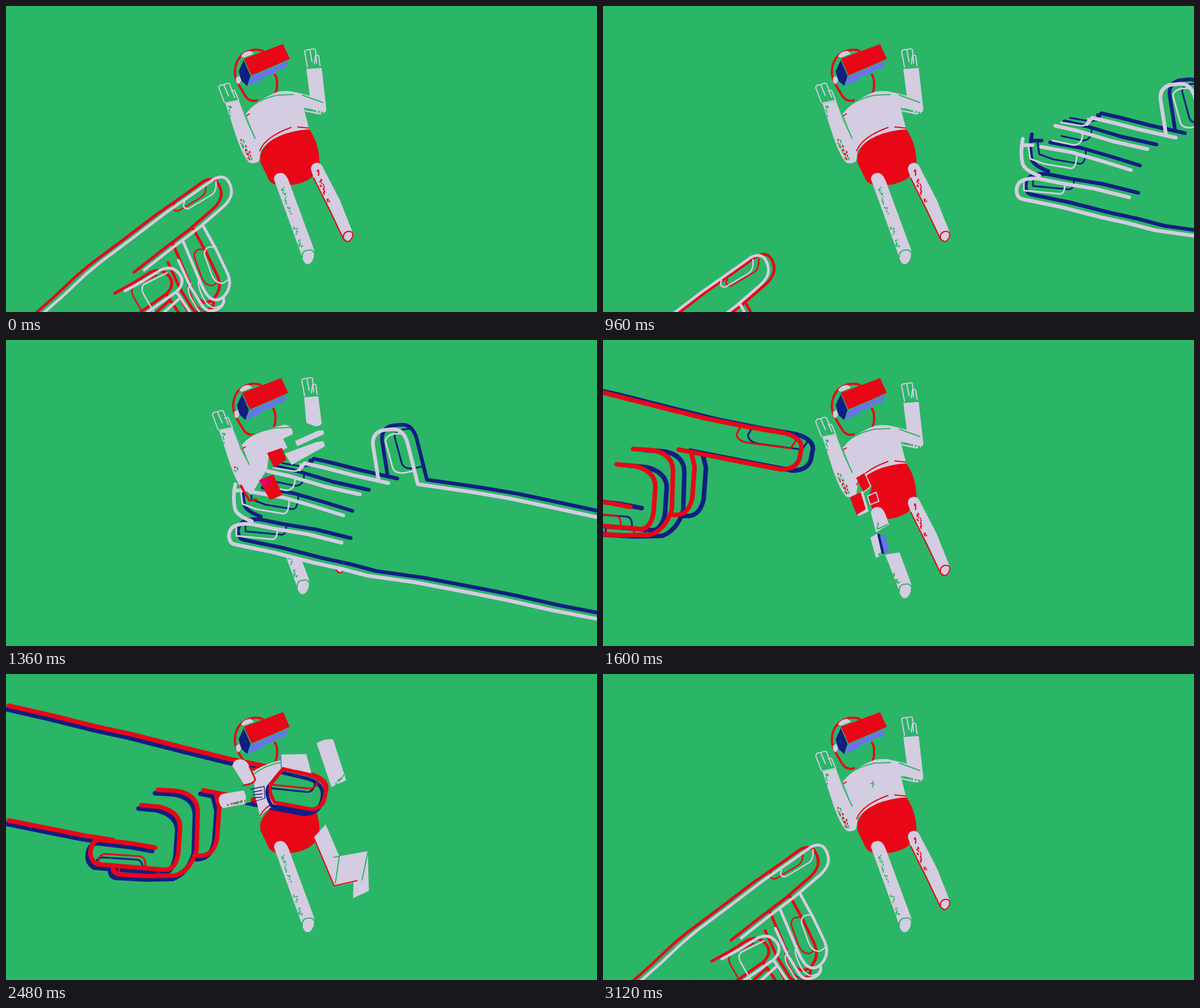
Write an HTML page with a canvas that moves like this. It is 1039 px wide and 539 px high and loops after 3.2 s.

```html
<!DOCTYPE html>
<html lang="en">
<head>
<meta charset="utf-8">
<title>Poke</title>
<style>
  html, body { margin: 0; width: 100%; height: 100%; overflow: hidden; background: #2bb567; }
  canvas { display: block; }
</style>
</head>
<body>
<canvas id="stage" width="1039" height="539"></canvas>
<script>
const ctx = document.getElementById('stage').getContext('2d');
const GREEN = '#2bb567', PALE = '#d4cce0', RED = '#e90617', NAVY = '#101f82', BLUE = '#6675e8', PINK = '#e6005c';
const LOOP = 3200, STEP = 80;

const fill = (d, color) => { ctx.fillStyle = color; ctx.fill(new Path2D(d)); };
const line = (d, color, width = 2) => {
  ctx.strokeStyle = color;
  ctx.lineWidth = width;
  ctx.stroke(new Path2D(d));
};
const at = (x, y, draw) => { ctx.save(); ctx.translate(x, y); draw(); ctx.restore(); };

// Piecewise linear value of [time, ...values] keys
function track(t, keys) {
  const i = keys.findIndex(k => k[0] > t);
  if (i === 0) return keys[0].slice(1);
  if (i < 0) return keys.at(-1).slice(1);
  const a = keys[i - 1], b = keys[i], p = (t - a[0]) / (b[0] - a[0]);
  return a.slice(1).map((v, j) => v + (b[j + 1] - v) * p);
}

// Stable scatter of dots along a segment
function speckle(x1, y1, x2, y2, count, color, spread = 5) {
  const noise = n => { const s = Math.sin(n * 91.7 + x1) * 4375.5; return s - Math.floor(s); };
  ctx.fillStyle = color;
  for (let i = 0; i < count; i++) {
    const p = noise(i), side = noise(i + 50) * spread;
    ctx.fillRect(x1 + (x2 - x1) * p + side, y1 + (y2 - y1) * p, 2, 2 + noise(i + 90) * 2);
  }
}

/* Hands */
const pointUp = {
  thick: 5, thin: 2.6,
  area: 'M-30 625L102 509L140 473L165 452L225 407L280 365L330 330L365 305Q380 297 389 306Q398 318 396 332Q393 345 378 357L340 390L243 465L60 620Z',
  bold: 'M-30 625L68 539L102 509L140 473L165 452L225 407L280 365L330 330L365 305Q380 297 389 306Q398 318 396 332Q393 345 378 357L340 390L290 428L243 465' +
    'M347 388L370 430L390 472Q398 492 386 508Q374 523 360 515Q351 509 341 485L312 416' +
    'M303 448L324 494L345 528Q353 541 370 535Q386 527 382 514' +
    'M209 502L240 485L270 466Q290 456 302 469Q318 485 300 503L245 542L190 585M300 504L336 558M255 560L303 517',
  fine: 'M314 345Q308 357 321 357L361 333Q371 327 369 309' +
    'M369 425Q348 421 349 438L361 472Q368 490 382 488L392 481' +
    'M341 479Q334 487 344 508Q355 534 369 531L380 527' +
    'M283 470L243 490Q236 496 242 508L264 546M325 490Q316 497 325 514L340 539'
};
const flat = {
  thick: 6.5, thin: 3,
  area: 'M525 217L655 248L645 182Q645 158 680 157Q701 158 706 180L724 254L1100 324L1100 503L880 458L635 415L540 392L402 360Q391 355 392 340Q393 322 430 318Q392 300 405 254L460 231Z',
  bold: 'M1100 324L1039 312L960 295L885 279L820 268L724 254L706 182Q699 157 680 157L662 159Q644 164 645 184L655 248' +
    'M672 252L610 238L560 225L525 217L516 228' +
    'M622 272L560 258L500 240L460 231M593 309L545 294L490 278L435 268' +
    'M590 357L530 342L470 332L430 324Q391 321 392 346Q393 358 402 360L470 374L540 392L590 403L635 415L720 427L820 446L880 458L960 476L1100 503' +
    'M432 319Q409 311 403 299Q398 280 403 254M405 265L420 265',
  fine: 'M699 165Q669 163 667 178L680 226Q685 236 700 234L720 230' +
    'M470 225L505 231Q517 232 518 218M455 257L493 265Q508 264 508 245' +
    'M413 268L416 289L440 298L488 306Q497 306 498 282' +
    'M405 326L405 345L468 351Q477 351 477 333'
};
const pointDown = {
  thick: 8, thin: 3.2,
  area: 'M5 56L160 93L220 106L314 130L394 149L474 166L534 176Q564 185 563 202L559 222Q552 240 527 240L454 226L347 205Z',
  bold: 'M5 56L80 73L160 93L220 106L314 130L394 150L474 166L534 176Q564 185 563 202L559 222Q552 240 527 240L454 226L347 205' +
    'M267 204L300 206Q338 212 337 245L335 310Q325 345 298 355L250 356L197 353Q187 350 188 338' +
    'M238 231L270 234Q306 243 306 270L303 315Q298 345 280 345L220 340L160 335Q144 325 150 305Q155 292 165 292L225 299L262 306' +
    'M369 210L375 235L371 290Q365 318 345 320L335 320' +
    'M5 258L75 272L140 285L187 292',
  fine: 'M163 332Q162 318 175 317L235 321Q246 322 245 340M199 340L199 350M268 343L268 352' +
    'M456 165L449 177Q449 190 469 193L544 203L554 188'
};

function drawHand(hand, [x, y], [ex, ey], main, echo) {
  const outline = color => { line(hand.fine, color, hand.thin); line(hand.bold, color, hand.thick); };
  at(x, y, () => {
    fill(hand.area, GREEN);
    at(ex, ey, () => outline(echo));
    outline(main);
  });
}

function fingertip([ex, ey]) {
  const tip = 'M487 167L534 178Q565 187 561 210Q557 239 536 238L472 226Q460 205 466 193Z';
  const nail = 'M468 195L536 202Q547 200 548 186';
  fill(tip, GREEN);
  at(ex, ey, () => { line(nail, NAVY, 3); line(tip, NAVY, 6); });
  line(nail, RED, 3);
  line(tip, RED, 6);
}

/* Body parts */
function head() {
  line('M451 79C440 75 425 77 414 87C402 98 400 118 405 130Q411 143 417 152M473 121L476 128', RED, 4);
  fill('M413 89Q418 79 430 79L436 84Q428 87 418 91Z', PALE);
  fill('M404 127L410 123L414 131L409 138L405 135Z', PALE);
  fill('M418 95L430 123L424 141L414 132L409 115Z', NAVY);
  fill('M432 124L497 96L491 110L477 113L470 120L455 123L450 130L425 141Z', BLUE);
  fill('M418 93L487 67L499 93L432 123Z', RED);
  line('M418 94L431 123L498 95', GREEN, 1.2);
}
const chin = () => line('M417 152Q426 171 441 166M476 128Q478 146 474 152', RED, 4);

function leftArm() {
  line('M384 170L374 144Q375 138 383 139L391 158M383 139Q388 135 393 137L402 161M396 150Q402 146 403 152L409 166L386 171', PALE);
  fill('M386 172L411 167L438 233L448 255L445 273Q438 279 428 276Q417 266 404 228Z', PALE);
  speckle(389, 174, 394, 198, 10, GREEN);
  speckle(406, 232, 428, 272, 22, GREEN, 9);
  speckle(408, 234, 426, 270, 14, RED, 9);
}

const rightHand = () =>
  line('M530 108L525 80Q527 76 534 77L538 98M534 77Q541 74 544 77L546 101M542 102L544 88Q550 85 550 90L552 105', PALE);

function rightArm() {
  rightHand();
  fill('M510 152L534 158L528 111L555 109L563 180Q564 191 550 191L522 185L511 165Z', PALE);
  line('M521 157L557 170M510 161L520 182', GREEN);
  speckle(520, 179, 556, 187, 28, GREEN, 4);
}

function torso() {
  fill('M421 188Q440 166 478 151Q500 147 517 155L533 217Q470 222 447 256L440 262L438 233Z', PALE);
  line('M422 188Q438 165 478 157L505 156M411 168L424 203L438 233', GREEN);
  line('M423 193L428 190', RED);
}
const waistline = () => line('M446 255Q456 230 501 214M513 213L532 215', RED);

// Left leg, cut off above the given height
function leftLeg(top) {
  const left = 471 + (top - 305) * .363, right = 497 + (top - 308) * .369;
  fill(top ? `M${left} ${top + 4}L${right} ${top}L542 430L541 443Q537 455 530 455Q523 454 520 440Z`
    : 'M471 305Q472 294 484 294Q492 295 497 308L542 430L541 443Q537 455 530 455Q523 454 520 440Z', PALE);
  line('M521 443Q520 430 532 430Q540 429 541 434', GREEN);
  speckle(482, Math.max(318, top), 517, 430, 34, GREEN, 6);
}

function rightLeg() {
  fill('M536 288Q536 277 547 276Q554 277 557 284L587 342L610 400Q611 414 601 415L593 408L570 358L541 303Z', PALE);
  line('M541 303L570 362L593 410Q602 421 609 407Q612 396 601 397Q592 399 593 410', RED);
  speckle(540, 283, 562, 345, 26, RED, 7);
}

const shorts = () => fill('M447 262Q462 226 512 217L534 218Q552 245 551 280Q545 308 505 315L475 315Q463 312 460 302L447 275Z', RED);

/* Poses: lower is behind the hands, upper in front, front covers the fingertip */
const restLower = () => { shorts(); leftLeg(0); rightLeg(); };
const restUpper = () => { head(); chin(); leftArm(); rightArm(); torso(); waistline(); };

const poses = {
  rest: { lower: restLower, upper: restUpper },

  poke: {
    lower() {
      fill('M438 261L459 251L480 240Q497 223 512 221L535 221Q552 248 551 280Q545 306 512 315Q497 313 488 296L478 279L460 292L462 304L454 308Z', RED);
      fill('M459 292L474 279L489 310L474 316Z', PALE);
      leftLeg(317);
      rightLeg();
    },
    upper() {
      head();
      chin();
      at(-3, 0, leftArm);
      at(-2, 0, rightArm);
      torso();
      fill('M447 256L470 228L532 214L535 221Q507 221 480 238L464 258L455 252Z', PALE);
      line('M454 252L474 236M473 231Q495 217 518 214L534 216', RED);
    }
  },

  slap: {
    lower() { at(-9, -7, () => leftLeg(0)); at(-13, -5, rightLeg); },
    upper() {
      at(-3, 0, () => { head(); chin(); });
      at(-11, -12, leftArm);
      at(-5, -9, rightHand);
      fill('M524 101L549 99L555 147Q550 154 541 151L528 146Z', PALE);
      fill('M508 178L548 160L558 159L559 166L512 187Z', PALE);
      fill('M490 200L545 180L558 178L561 187L502 220Z', PALE);
      fill('M414 183Q432 163 490 149Q505 152 504 166L487 174L495 190L462 203L459 228L446 248L431 273L419 262L400 235L428 220Z', PALE);
      line('M415 183Q432 162 473 155L502 154M400 156L413 191L427 218', GREEN);
      line('M416 191L421 188', RED);
      fill('M459 199L485 190L493 211L471 225Z', RED);
      fill('M445 247L470 237L486 273L464 282Z', RED);
      fill('M445 247L460 240L467 250L454 262Z', PINK);
      line('M413 257L428 283L440 281', RED, 4);
    }
  },

  crack: {
    lower() {
      fill('M462 238Q485 220 512 217L534 218Q552 245 551 280Q545 308 505 315L480 313L466 278L472 262Z', RED);
      fill('M471 305Q472 294 484 294Q492 295 497 308L503 325L480 339Z', PALE);
      line('M482 333L484 322M483 333L500 325', GREEN);
      fill('M470 348L482 341L491 378L480 384Z', PALE);
      fill('M482 341L487 342L495 376L490 377Z', NAVY);
      fill('M487 345L495 342L503 370L495 377Z', BLUE);
      leftLeg(374);
      rightLeg();
    },
    upper() {
      restUpper();
      fill('M445 243L460 234L472 258L458 268Z', RED);
      line('M461 236L471 258L458 268', PALE);
      fill('M434 277L457 266L467 302L449 310Z', PALE);
      fill('M434 277L453 268L462 298L446 308Z', RED);
      line('M465 275L480 268L485 284L470 290Z', PALE);
    }
  },

  pierce: {
    lower() {
      fill('M461 252L467 246L528 250L526 270L513 290L482 293Z', RED);
      fill('M527 254L560 242L564 255L530 269Z', RED);
      fill('M519 300L530 272L556 265L557 285L535 303Z', RED);
      fill('M477 310Q480 296 490 296Q497 297 503 308Q525 345 527 370L538 447Q538 458 527 459Q517 455 515 440L507 385Q500 345 483 322Z', PALE);
      line('M517 455Q515 442 525 442L536 443', GREEN);
      speckle(481, 316, 496, 350, 16, GREEN);
      speckle(505, 372, 512, 425, 14, GREEN, 3);
      at(3, 6, rightLeg);
    },
    upper() {
      at(13, -17, head);
      line('M474 132Q474 148 457 157Q438 170 418 163', RED, 4);
      ctx.save();
      ctx.translate(404, 164);
      ctx.rotate(.27);
      at(-398, -170, leftArm);
      ctx.restore();
      at(9, -7, rightArm);
      fill('M426 183Q440 163 475 150L501 146L509 160L508 172L485 170L470 185L466 205L450 217L440 207Z', PALE);
      line('M430 187Q445 163 480 152L502 151', GREEN);
      fill('M420 217L445 207L459 233L428 248Z', PALE);
      fill('M557 222L573 222L573 238L560 237Z', BLUE);
      fill('M573 222L590 219L589 236L573 238Z', RED);
      fill('M557 222L573 217L591 218L573 222Z', NAVY);
    },
    front() {
      fill('M449 195L452 187L460 187L460 206L449 203Z', NAVY);
      fill('M452 187L475 183L474 188L459 188Z', BLUE);
      fill('M459 188L474 186L476 204L460 206Z', PALE);
      fill('M463 206L470 205L475 220L467 221Z', RED);
      fill('M468 222L513 221L510 250L475 248Z', NAVY);
      fill('M468 222L485 215L532 216L528 222Z', BLUE);
      fill('M513 222L532 220L537 243L510 250Z', PALE);
      speckle(486, 241, 512, 246, 16, PALE, 3);
    }
  },

  kick: {
    lower() {
      shorts();
      leftLeg(0);
      fill('M541 288L562 265L586 321L636 312L638 382L610 395L611 367L577 374Z', PALE);
      line('M541 288L577 373L617 364', RED);
      line('M576 323L586 321L579 368M636 314L626 363', GREEN);
    },
    upper() {
      head();
      chin();
      fill('M434 172Q450 160 483 152L500 150L533 217Q470 222 447 252L438 215Z', PALE);
      line('M436 176Q455 161 482 156', GREEN);
      line('M447 249Q455 235 468 229', RED);
      fill('M482 142L528 141L537 175L485 163Z', PALE);
      line('M483 143L484 165', BLUE);
      fill('M398 162Q400 150 413 150Q424 152 428 163L438 183Q439 193 420 197Z', PALE);
      line('M428 163L438 185Q438 193 418 196', RED, 3);
      fill('M418 204L432 203L430 226L420 228Z', GREEN);
      fill('M374 222Q374 212 382 211L418 205Q424 215 421 229L382 236Q376 234 374 222Z', PALE);
      speckle(384, 230, 416, 222, 20, RED, 4);
      speckle(384, 229, 416, 223, 14, GREEN, 4);
      line('M430 203L454 198L455 219L432 226M434 208L450 205M434 213L451 211M434 218L450 217', NAVY, 1.3);
      fill('M546 122Q560 113 575 115L598 187L572 199Z', PALE);
      speckle(576, 193, 594, 174, 14, GREEN, 3);
    }
  }
};

const schedule = [[2720, 'rest'], [2400, 'kick'], [1840, 'pierce'], [1440, 'crack'], [1040, 'slap'], [960, 'rest'], [480, 'poke'], [0, 'rest']];

function render(t) {
  const pose = poses[schedule.find(([start]) => t >= start)[1]];
  const [lift] = track(t, [[320, 0], [560, 1], [800, 1], [960, 0], [2720, 0], [2800, .3], [3040, .15], [3120, 0]]);
  const up = track(t, [[80, 0, 0], [560, 39, -19], [720, 49, -24], [800, 49, -24], [1120, -260, 300], [2720, -260, 300], [3040, 0, 0]]);
  const upEcho = track(t, [[80, -18, 4], [560, 10, -2], [1120, 10, -2], [2720, -18, 4]]);
  const side = track(t, [[800, 670, -40], [1120, 0, 0], [1360, 0, 0], [1600, 700, 60]]);
  const down = track(t, [[1360, -620, -60], [1600, -214, -12], [2000, 0, 0], [2480, 0, 0], [2800, -620, -60]]);
  const downEcho = track(t, [[1600, 20, 2], [2000, -5, 6]]);
  const body = draw => {
    ctx.save();
    ctx.transform(1, 0, -.006 * lift, 1 + .009 * lift, 4.4 * lift, -6.8 * lift);
    draw();
    ctx.restore();
  };

  ctx.fillStyle = GREEN;
  ctx.fillRect(0, 0, 1039, 539);
  body(pose.lower);
  if (t < 1120 || t > 2720) drawHand(pointUp, up, upEcho, PALE, RED);
  if (t > 800 && t < 1600) drawHand(flat, side, [16, -8], PALE, NAVY);
  if (t > 1360 && t < 2800) drawHand(pointDown, down, downEcho, RED, NAVY);
  body(pose.upper);
  if (t >= 1840 && t <= 2480) at(...down, () => fingertip(downEcho));
  if (pose.front) pose.front();
  if (t >= 3120) line('M474 189L476 194L471 193M476 194L474 199', GREEN);
}

ctx.lineCap = ctx.lineJoin = 'round';
function tick() {
  render(Math.floor(performance.now() / STEP) * STEP % LOOP);
  requestAnimationFrame(tick);
}
tick();
</script>
</body>
</html>
```
